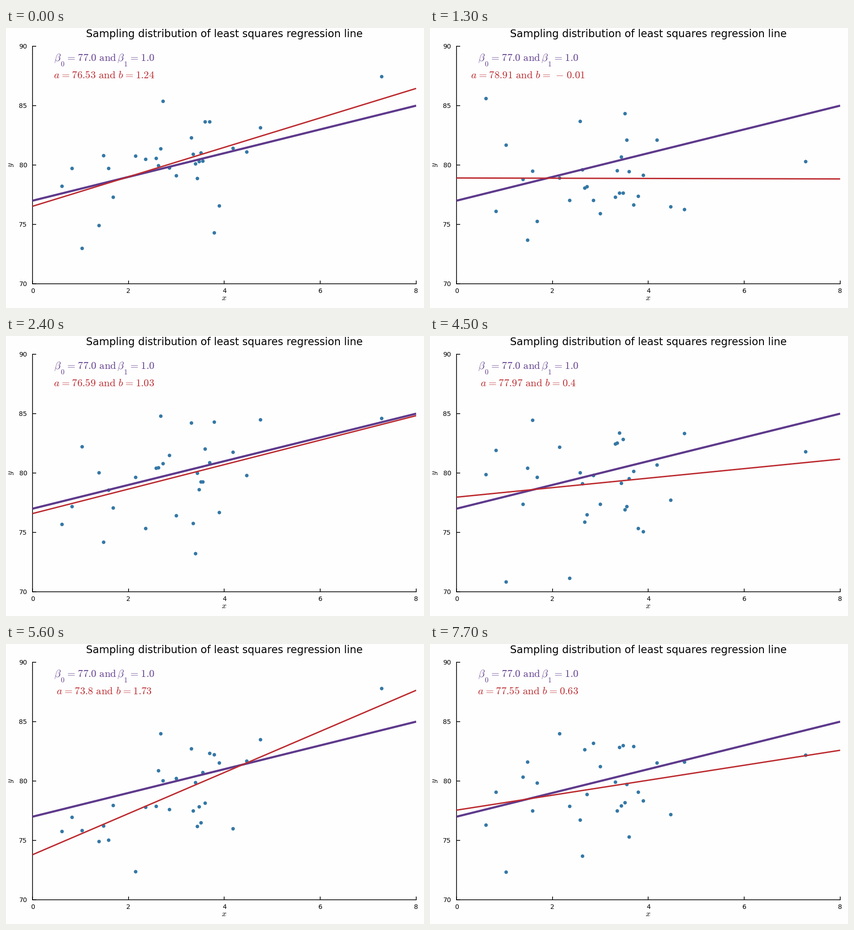
Write a matplotlib script that moves like this. It is 914 px wide and 613 px high and loops after 8000 ms.

```python
import numpy as np
import matplotlib.pyplot as plt
from matplotlib.animation import FuncAnimation

W, H, DPI = 914, 613, 64
LEFT, RIGHT, TOP, BOTTOM = 58.2, 896.8, 40, 560
PURPLE, RED, BLUE, PAPER = "#5e3a8c", "#bc2a2f", "#3578a6", "#fefefe"
STEP, LOOP = 100, 8000
MATH = 22.7
GAP = r"\hspace{0.06}"

plt.rcParams["font.family"] = "DejaVu Sans"
plt.rcParams["mathtext.fontset"] = "cm"

# All samples share the same x values: a dense middle and one far point.
KNOTS = {0: 0.61, 2: 1.03, 3: 1.38, 6: 1.68, 7: 2.14, 9: 2.57, 12: 2.72,
         14: 2.99, 15: 3.31, 22: 3.59, 25: 3.89, 28: 4.75, 29: 7.28}
xs = np.interp(np.arange(30), list(KNOTS), list(KNOTS.values()))
design = np.column_stack([np.ones_like(xs), xs])


def sample(seed, a, b, fixed):
    """Seeded noise through the fixed points, with a + b*x as its exact fit."""
    rng = np.random.default_rng(seed)
    line = a + b * xs
    ys = line + rng.normal(0, 2.6, len(xs))
    ys = np.clip(ys, min(fixed.values()) + 0.5, 83.5)
    free = np.ones(len(xs), bool)
    for i, y in fixed.items():
        ys[i], free[i] = y, False
    part = design[free]
    ys[free] -= part @ np.linalg.solve(part.T @ part, design.T @ (ys - line))
    return ys, a, b


# Start time in ms and the sample shown from then on; the fixed points are
# the lowest, the highest and the far right one.
SCENES = [
    (0, sample(1, 76.53, 1.24, {2: 73.0, 12: 85.4, 29: 87.45})),
    (300, sample(2, 77.4, 0.85, {4: 73.0, 29: 83.5})),
    (1300, sample(3, 78.91, -0.01, {4: 73.7, 20: 84.35, 29: 80.3})),
    (2400, sample(4, 76.59, 1.03, {17: 73.25, 11: 84.8, 29: 84.6})),
    (3500, sample(5, 75.62, 1.41, {4: 72.25, 29: 87.9})),
    (4500, sample(6, 77.97, 0.4, {8: 71.15, 5: 84.45, 29: 81.8})),
    (5600, sample(7, 73.8, 1.73, {7: 72.4, 11: 84.0, 29: 87.8})),
    (6600, sample(8, 76.84, 1.12, {5: 73.5, 29: 85.3})),
    (7700, sample(9, 77.55, 0.63, {2: 72.35, 7: 84.0, 29: 82.2})),
]
STARTS = [start for start, _ in SCENES]


def pt(px):
    return px * 72 / DPI


fig = plt.figure(figsize=(W / DPI, H / DPI), dpi=DPI, facecolor=PAPER)
ax = fig.add_axes([LEFT / W, 1 - BOTTOM / H,
                   (RIGHT - LEFT) / W, (BOTTOM - TOP) / H], facecolor=PAPER)
ax.set(xlim=(0, 8), ylim=(70, 90),
       xticks=range(0, 9, 2), yticks=range(70, 91, 5))
ax.tick_params(direction="in", length=pt(7.5), width=pt(1.6),
               labelleft=False, labelbottom=False)
ax.spines[["top", "right"]].set_visible(False)
ax.spines[["left", "bottom"]].set_linewidth(pt(1.6))


def label(x, y, text, size, color="black", ha="center", va="baseline", **kw):
    return fig.text(x / W, 1 - y / H, text, fontsize=pt(size), color=color,
                    ha=ha, va=va, **kw)


label(477.4, 19.7, "Sampling distribution of least squares regression line", 22.73)
for value in range(0, 9, 2):
    label(LEFT + value * (RIGHT - LEFT) / 8, 580.2, str(value), 14.1)
for value in range(70, 91, 5):
    label(46.3, BOTTOM - (value - 70) * 26 + 5.1, str(value), 14.1, ha="right")
label(477, 596.5, "$x$", 17.8)
label(10.5, 300, "$y$", 17.8, va="center", rotation=90)

# True coefficients, with deep subscripts set as separate pieces.
for x, y, text, size in [
    (104.7, 72.5, r"$\beta$", MATH),
    (119, 84.2, "$0$", MATH * 0.7),
    (129.7, 72.5, rf"$={GAP}77.0\ \mathrm{{and}}$", MATH),
    (243.4, 72.5, r"$\beta$", MATH),
    (257, 84.2, "$1$", MATH * 0.7),
    (267.5, 72.5, rf"$={GAP}1.0$", MATH),
]:
    label(x, y, text, size, PURPLE, ha="left")
fit_text = label(214.4, 109.7, "", MATH, RED)

ends = np.array([0, 8])
dots = ax.scatter(xs, xs, s=pt(7.8) ** 2, color=BLUE, linewidths=0, zorder=2)
ax.plot(ends, 77 + ends, color=PURPLE, lw=pt(4.6),
        solid_capstyle="butt", zorder=3)
fit_line, = ax.plot(ends, ends, color=RED, lw=pt(3),
                    solid_capstyle="butt", zorder=4)


def number(value):
    sign = r"\hspace{0.32}{-}\hspace{0.32}" if value < 0 else ""
    return f"{sign}{abs(value)}"


def equation(a, b):
    return (rf"$a{GAP}={GAP}{number(a)}\ \mathrm{{and}}\ "
            rf"b{GAP}={GAP}{number(b)}$")


def draw(frame):
    index = np.searchsorted(STARTS, frame * STEP, side="right") - 1
    ys, a, b = SCENES[index][1]
    dots.set_offsets(np.column_stack([xs, ys]))
    fit_line.set_ydata(a + b * ends)
    fit_text.set_text(equation(a, b))
    return dots, fit_line, fit_text


anim = FuncAnimation(fig, draw, frames=LOOP // STEP, interval=STEP,
                     repeat=True, repeat_delay=0)
plt.show()
```
